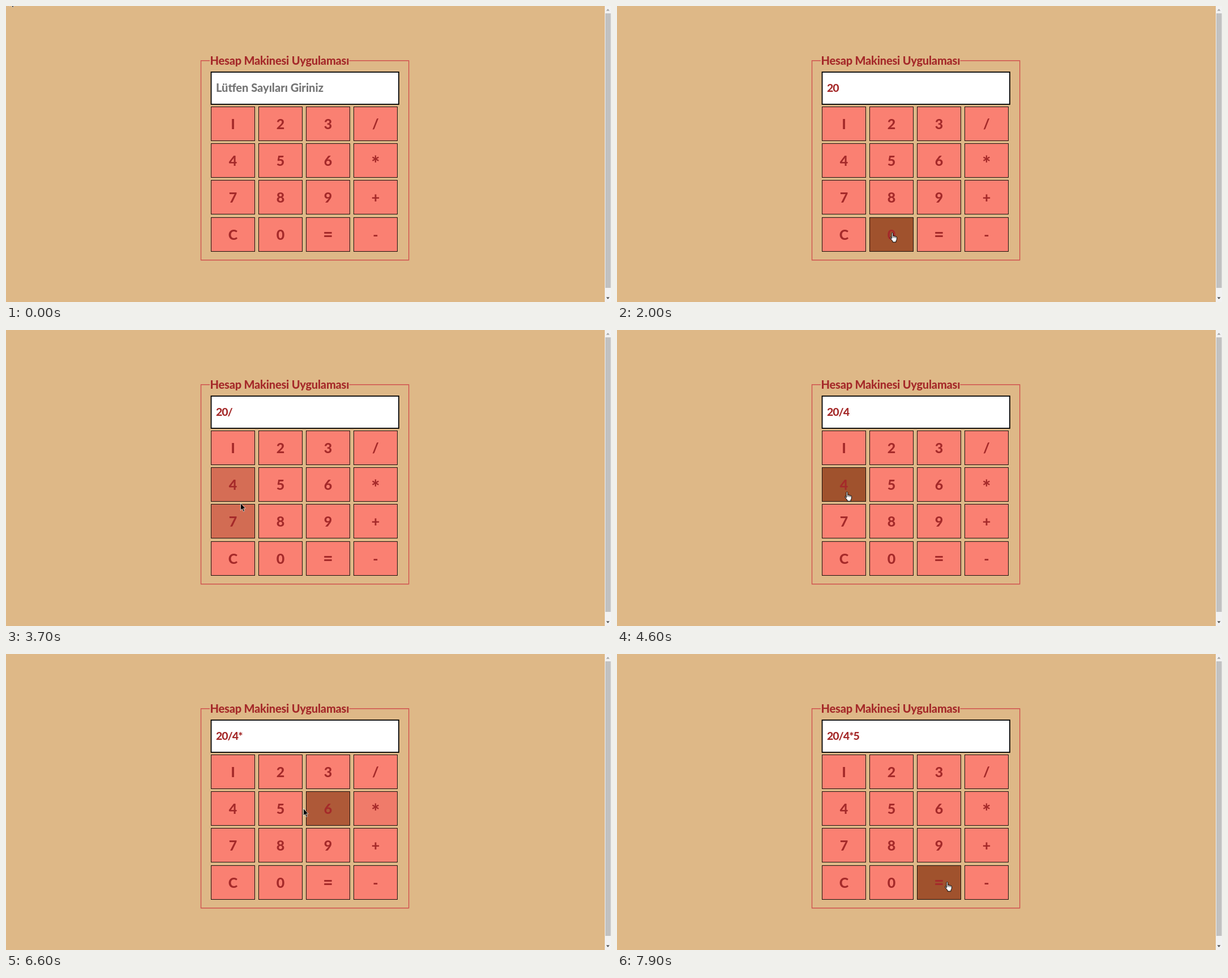
These frames come from a looping animation (1069 px wide and 524 px high, 8 s). An HTML page:

```html
<!DOCTYPE html>
<html lang="tr">
<head>
<meta charset="utf-8">
<title>Hesap Makinesi</title>
<style>
  html, body { margin: 0; width: 100%; height: 100%; overflow: hidden; background: #deb887; }
  svg { display: block; width: 100%; height: 100%; }
  text { font-family: Lato, "Open Sans", sans-serif; font-weight: 800; fill: #a52a2a; }
  #hint { fill: #757575; }
</style>
</head>
<body>
<svg viewBox="0 0 1069 524">
  <rect width="1069" height="524" fill="#deb887"/>
  <path d="M360 96.7H344.5V449.7H711.7V96.7H606.5" fill="none" stroke="#d0524f" stroke-width="1.4"/>
  <text x="360.5" y="103.5" font-size="20" letter-spacing="-.2">Hesap Makinesi Uygulaması</text>
  <rect x="362.5" y="117" width="331.5" height="57" fill="#fff" stroke="#000" stroke-width="1.8"/>
  <text id="hint" x="371" y="152" font-size="20">Lütfen Sayıları Giriniz</text>
  <text id="entry" x="371" y="152" font-size="19.5" letter-spacing="-1"></text>
  <g id="keys"></g>
  <rect x="1058" width="11" height="524" fill="#f1f1f1"/>
  <rect x="1059" y="13" width="9.5" height="486" fill="#c1c1c1"/>
  <path d="M1060.5 8.5l3-3.5 3 3.5z" fill="#a3a3a3"/>
  <path d="M1060.5 515.5l3 3.5 3-3.5z" fill="#505050"/>
  <path id="arrow" d="M.5 .5V13.2L3.4 10.6L5.5 15.4L7.5 14.5L5.5 9.9H9.2Z" stroke="#fff" stroke-width=".7"/>
  <g id="hand" stroke="#000">
    <path d="M-.8 10.8V1.8Q-.8 .6 .4 .6T1.6 1.8V6.2Q3 5 4 6.5Q5.5 5.7 6.2 7.2Q8.4 6.6 8.4 8.8V11.5Q8.2 13.4 7 14.8V17H1V15.2Q-1.2 12.8 -3.2 9.8Q-3.7 8.5 -2.6 8.2Q-1.6 8.3 -.8 10Z" fill="#fff" stroke-linejoin="round"/>
    <path d="M1.6 6.2V9.5M4 6.6V9.6M6.2 7.2V9.8" stroke-width=".8"/>
  </g>
</svg>
<script>
const LOOP = 8000, STEP = 100, FADE = 300, LAG = 40;
const SALMON = [250, 128, 114], SIENNA = [160, 82, 45];
const $ = id => document.getElementById(id);

// pointer moves; press is the time of the click after arriving
const origin = { x: 6, y: -13 };
const moves = [
  { from: 350, to: 500, x: 286, y: 150 },
  { from: 600, to: 850, x: 486, y: 212, press: 1200 },
  { from: 1350, to: 1800, x: 486, y: 401, press: 2000 },
  { from: 2250, to: 2800, x: 652, y: 210, press: 3000 },
  { from: 3130, to: 3430, x: 426, y: 293 },
  { from: 3530, to: 3650, x: 416, y: 312 },
  { from: 3670, to: 4000, x: 406, y: 286, press: 4200 },
  { from: 4610, to: 4900, x: 656, y: 361 },
  { from: 5190, to: 5930, x: 655, y: 288, press: 6000 },
  { from: 6320, to: 6945, x: 499, y: 270, press: 7200 },
  { from: 7350, to: 7800, x: 583, y: 403 }
];

function add(tag, attrs) {
  const el = document.createElementNS("http://www.w3.org/2000/svg", tag);
  for (const k in attrs) el.setAttribute(k, attrs[k]);
  return $("keys").appendChild(el);
}

const glyphs = { "*": { size: 36, dy: 8.5 }, "=": { size: 30, dy: 1 } };
const keys = [..."123/456*789+C0=-"].map((label, i) => {
  const x = 362.5 + 84 * (i % 4), y = 178.5 + Math.round(65.2 * Math.floor(i / 4));
  const { size, dy } = glyphs[label] || { size: 25, dy: 0 };
  const box = add("rect", { x, y, width: 77, height: 60, stroke: "#1c0f0c" });
  const text = add("text", { x: x + 38.5, y: y + 39.5 + dy, "font-size": size, "text-anchor": "middle" });
  text.textContent = label === "1" ? "I" : label;  // the one is a plain bar
  return { label, x, y, box, visits: [] };
});

const clamp = p => Math.min(1, Math.max(0, p));
const easeOut = p => 1 - (1 - p) ** 3;

// the CSS "ease" curve
function ease(p) {
  let lo = 0, hi = 1;
  for (let i = 0; i < 20; i++) {
    const u = (lo + hi) / 2;
    if (.75 * u * (1 - u) + u ** 3 < p) lo = u; else hi = u;
  }
  return .3 * lo * (1 - lo) ** 2 + 3 * lo * lo * (1 - lo) + lo ** 3;
}

function pointer(t) {
  let { x, y } = origin;
  for (const m of moves) {
    const p = easeOut(clamp((t - m.from) / (m.to - m.from)));
    x += (m.x - x) * p;
    y += (m.y - y) * p;
  }
  return { x, y };
}

function keyAt(t) {
  const { x, y } = pointer(t);
  return keys.find(k => Math.abs(x - k.x - 38.5) <= 39 && Math.abs(y - k.y - 30) <= 30.5);
}

// note when the pointer enters and leaves each key
for (let t = 0, last, visit; t < LOOP; t += 5) {
  const key = keyAt(t);
  if (key !== last && key) key.visits.push(visit = { on: t + LAG });
  if (key) visit.off = t + LAG;
  last = key;
}
const typed = moves.filter(m => m.press).map(m => ({ at: m.press, char: keyAt(m.press).label }));

function shade(key, t) {
  const levels = key.visits.map(({ on, off }) =>
    ease(clamp((Math.min(t, off) - on) / FADE)) * (1 - ease(clamp((t - off) / FADE))));
  return Math.max(0, ...levels);
}

function show(id, on) {
  $(id).style.display = on ? "" : "none";
}

function draw(ms) {
  const t = Math.floor((ms % LOOP) / STEP) * STEP;
  for (const key of keys) {
    const v = shade(key, Math.min(t, LOOP));
    key.box.setAttribute("fill", `rgb(${SALMON.map((c, i) => Math.round(c + (SIENNA[i] - c) * v))})`);
  }
  const value = typed.filter(e => e.at <= t).map(e => e.char).join("");
  $("entry").textContent = value;
  show("hint", !value);

  const { x, y } = pointer(t);
  const over = Boolean(keyAt(t));
  for (const id of ["arrow", "hand"]) {
    $(id).setAttribute("transform", `translate(${Math.round(x)} ${Math.round(y)})`);
    show(id, over === (id === "hand"));
  }
}

const start = performance.now();
function tick() {
  draw(performance.now() - start);
  requestAnimationFrame(tick);
}
tick();
</script>
</body>
</html>
```
